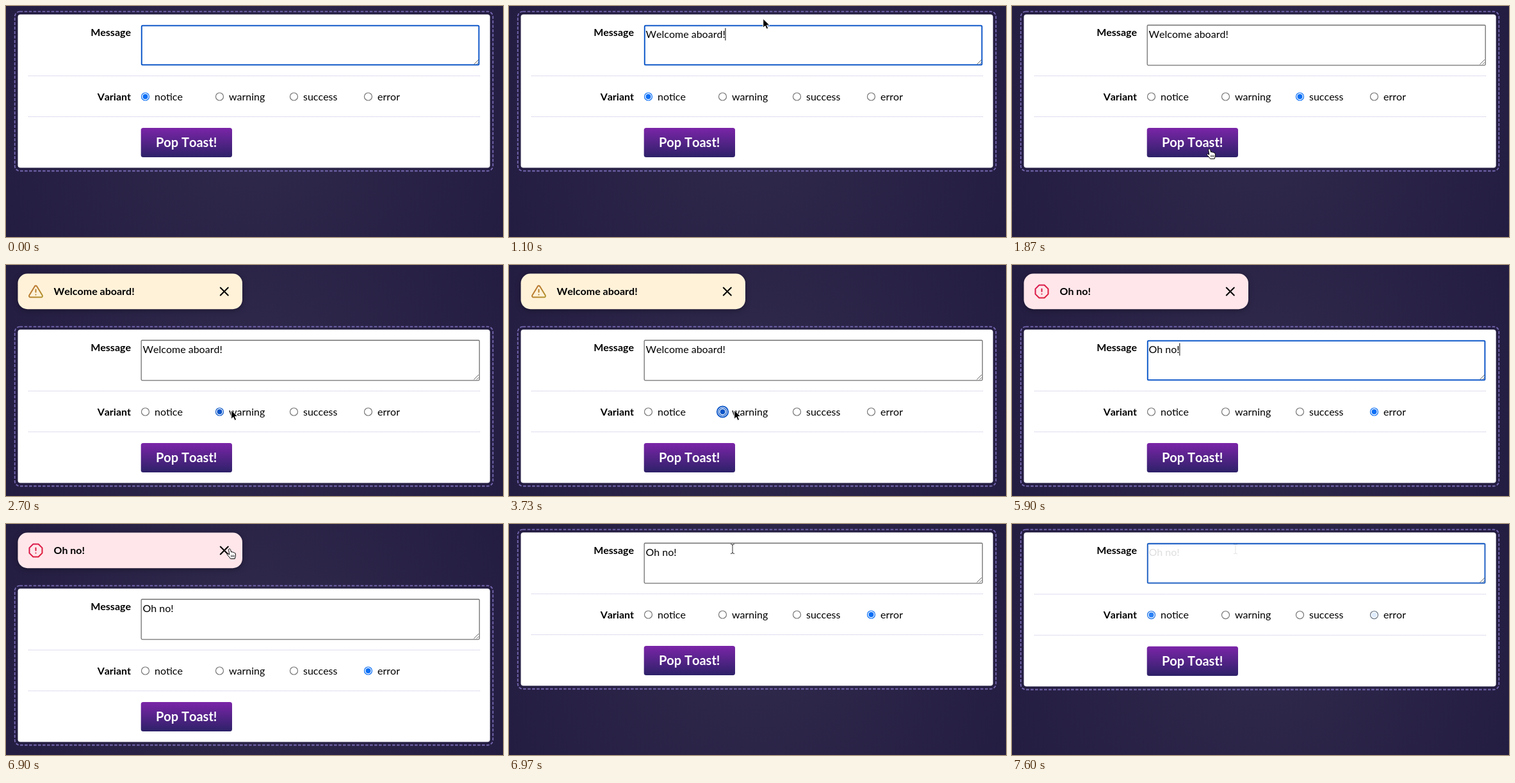
These frames come from a looping animation (776x362 px, 7630 ms). An HTML page:

```html
<!DOCTYPE html>
<html lang="en">
<head>
<meta charset="utf-8">
<title>Toast playground</title>
<style>
  html, body { margin: 0; width: 100%; height: 100%; overflow: hidden; background: #2a2346; }
  svg { display: block; font: 16px Lato, sans-serif; font-kerning: none; }
  text { white-space: pre; }
  .bold { font-weight: 700; }
  .toast { filter: drop-shadow(0 2px 4px #0005); }
  .line { fill: none; stroke-linecap: round; stroke-linejoin: round; }
</style>
</head>
<body>
<svg width="776" height="362" viewBox="0 0 776 362">
  <defs>
    <radialGradient id="night" gradientUnits="userSpaceOnUse" cx="388" cy="181" r="430">
      <stop stop-color="#302a4c"/><stop offset="1" stop-color="#241d42"/>
    </radialGradient>
    <linearGradient id="button" x2="0" y2="1">
      <stop stop-color="#7b25a8"/><stop offset="1" stop-color="#2d2168"/>
    </linearGradient>
    <g id="arrow" stroke="#fff" stroke-linejoin="round">
      <path d="M0 0V14L3.2 11L5.4 16L8 14.9L5.8 10H10.2Z"/>
    </g>
    <g id="hand" fill="#fff" stroke="#000" stroke-linejoin="round">
      <path d="M-1.4 1.2Q-1-.6 .6 0Q1.4 .4 1.7 1.6L2.6 5Q4.4 4 5.2 5.4Q6.8 4.8 7.4 6.2Q9.2 6 9.4 8Q9.8 12 8.2 15.5H1.6Q-.6 12-3.6 9.4Q-4.4 7.8-2.4 7.8L-.2 9Z"/>
      <path d="M2.8 9.5v3.5M4.9 9.5v3.5M7 9.5v3.5" stroke-width=".8"/>
    </g>
    <path id="beam" d="M-3-7.5Q0-7.5 0-5.5Q0-7.5 3-7.5M0-5.5V5.5M-3 7.5Q0 7.5 0 5.5Q0 7.5 3 7.5" fill="none" stroke="#333"/>
  </defs>
  <rect width="776" height="362" fill="url(#night)"/>
  <g id="stage"></g>
</svg>
<script>
const LOOP = 7630, FADE = 7400, SHIFT = 88, FOCUS = '#1059c9';
const stage = document.getElementById('stage');
const defs = document.querySelector('defs');
const pen = document.createElement('canvas').getContext('2d');

const variants = {
  notice: { fill: '#e9edff', from: '#3d4be0', to: '#8a35d8',
    icon: '<circle cx="12" cy="12" r="10"/><path d="M12 16v-4M12 8h.01"/>' },
  warning: { fill: '#fff2d9', from: '#bf6a30', to: '#b0982c',
    icon: '<path d="M10.3 3.9L1.8 18a2 2 0 0 0 1.7 3h17a2 2 0 0 0 1.7-3L13.7 3.9a2 2 0 0 0-3.4 0zM12 9v4M12 17h.01"/>' },
  success: { fill: '#e4f9ee', from: '#0b8f5a', to: '#1fa9a0',
    icon: '<path d="M22 11.1V12a10 10 0 1 1-5.9-9.1M22 4L12 14l-3-3"/>' },
  error: { fill: '#ffe6ea', from: '#d81450', to: '#e01f38',
    icon: '<path d="M7.9 2h8.2L22 7.9v8.2L16.1 22H7.9L2 16.1V7.9zM12 8v4M12 16h.01"/>' },
};
const names = Object.keys(variants);
for (const name of names) {
  const { from, to } = variants[name];
  defs.innerHTML += `<linearGradient id="${name}" x2="1" y2="1" gradientUnits="userSpaceOnUse" gradientTransform="scale(24)">
    <stop stop-color="${from}"/><stop offset="1" stop-color="${to}"/></linearGradient>`;
}

const choices = [[0, 'notice'], [1430, 'success'], [2630, 'warning'], [3130, 'notice'],
  [3730, 'warning'], [4100, 'success'], [4570, 'error']];
const retype = [5530, 5600, 5670, 5730, 5830, 5900];
const route = [[1030, 385, 0], [1330, 468, 142], [1570, 468, 142], [1830, 308, 224],
  [2170, 308, 224], [2570, 351.7, 227.5], [4930, 351.7, 227.5], [5200, 348, 133],
  [6370, 348, 133], [6700, 349, 39]];

const during = (t, a, b) => t >= a && t < b;
const inside = (p, x, y, w, h) => during(p.x, x, x + w) && during(p.y, y, y + h);
const label = (x, y, str, attrs = '') => `<text x="${x}" y="${y}" ${attrs}>${str}</text>`;

function textWidth(str) {
  pen.font = '16px Lato, sans-serif';
  pen.fontKerning = 'none';
  return pen.measureText(str).width;
}

function message(t) {
  if (t < 100) return '';
  if (t < retype[0]) return 'Welcome aboard!'.slice(0, Math.floor((t - 100) / 47.8) + 1);
  return 'Oh no!'.slice(0, retype.filter(at => at <= t).length);
}

function pointer(t) {
  if (t < 1030 || during(t, retype[0], 6370)) return null;
  const next = route.findIndex(p => p[0] > t);
  if (next < 0) { const [, x, y] = route.at(-1); return { x, y }; }
  const [t0, x0, y0] = route[next - 1], [t1, x1, y1] = route[next];
  const k = (t - t0) / (t1 - t0), ease = k * k * (3 - 2 * k);
  return { x: x0 + (x1 - x0) * ease, y: y0 + (y1 - y0) * ease };
}

function radio(name, i, picked, ring, mouse) {
  const x = 217.5 + i * 116, y = 142;
  const hover = mouse && inside(mouse, x - 8, y - 12, 85, 24);
  const color = picked ? (hover ? '#0a55c8' : '#0b6ff5') : (hover ? '#4f4f4f' : '#767676');
  return `<circle cx="${x}" cy="${y}" r="6" fill="#fff" stroke="${color}" stroke-width="1.2"/>`
    + (picked ? `<circle cx="${x}" cy="${y}" r="4" fill="${color}"/>` : '')
    + (picked && ring ? `<circle cx="${x}" cy="${y}" r="8.6" fill="none" stroke="${FOCUS}" stroke-width="2"/>` : '')
    + label(x + 14.5, 147.6, name);
}

function textarea(t) {
  const str = message(t), end = 213.5 + textWidth(str);
  const focused = t < 1430 || during(t, 5200, 6900);
  const selected = during(t, 5370, retype[0]);
  const caret = during(t, 100, 1270) || during(t, 5200, 6230) || during(t, 6700, 6900);
  const box = focused
    ? `<rect x="211.8" y="30.8" width="526.6" height="61.4" rx="1.5" stroke="${FOCUS}" stroke-width="2"`
    : '<rect x="211.2" y="30" width="528" height="62.8" rx="1.5" stroke="#707070" stroke-width="1.3"';
  return `${box} fill="#fff"/>`
    + '<path d="M730.5 91.5l7.5-7.5M734.8 91.5l3.2-3.2" stroke="#555" stroke-width=".9"/>'
    + (selected ? `<rect x="213.5" y="35" width="${end - 213.5}" height="20" fill="#b4d5fe"/>` : '')
    + label(213.5, 50.2, str)
    + (caret && !selected ? `<path d="M${end + .2} 34.5v19.5" stroke="#000"/>` : '');
}

function toast(str, name) {
  const { fill, icon } = variants[name];
  return `<g class="toast"><rect x="18.5" y="13.5" width="350.5" height="55.7" rx="15" fill="${fill}"/></g>
    <g class="line" stroke-width="2">
      <g transform="translate(34.5 29.5)" stroke="url(#${name})">${icon}</g>
      <path d="M334.8 35.5l12 12m0-12l-12 12" stroke="#000"/>
    </g>` + label(74.5, 47.3, str, 'class="bold"');
}

function cursor(mouse, popped, dy) {
  const onPage = { x: mouse.x, y: mouse.y - dy };
  const clickable = inside(onPage, 211, 191, 142, 46) || (popped && inside(mouse, 328, 28, 27, 28));
  const kind = clickable ? 'hand' : inside(onPage, 211, 30, 528, 63) ? 'beam' : 'arrow';
  return `<use href="#${kind}" x="${mouse.x}" y="${mouse.y}"/>`;
}

function scene(t) {
  const popped = during(t, 1900, 6970), dy = popped ? SHIFT : 0;
  const choice = choices.findLast(c => c[0] <= t)[1];
  const ring = during(t, 3130, 5200);
  const mouse = pointer(t);
  const onPage = mouse && { x: mouse.x, y: mouse.y - dy };
  return `${popped ? toast(message(t), choice) : ''}
    <g transform="translate(0 ${dy})">
      <rect x="13.7" y="8.7" width="746.6" height="249.8" rx="8" fill="none" stroke="#7668b2" stroke-width="1.8" stroke-dasharray="4.6 2.4"/>
      <rect x="18.5" y="13.2" width="737.2" height="240.4" rx="4" fill="#fff"/>
      <path d="M35 109.5H740M35 173.5H740" stroke="#c0bbdf" stroke-dasharray="1 1"/>
      <g class="bold" text-anchor="end">${label(195, 47.3, 'Message')}${label(195, 147.6, 'Variant')}</g>
      ${textarea(t)}
      ${names.map((name, i) => radio(name, i, name === choice, ring, onPage)).join('')}
      <rect x="210.7" y="191" width="142.3" height="46" rx="3.5" fill="url(#button)"/>
      ${label(281.7, 221.3, 'Pop Toast!', 'class="bold" font-size="20" fill="#fff" text-anchor="middle"')}
    </g>
    ${mouse ? cursor(mouse, popped, dy) : ''}`;
}

function draw(now) {
  const t = now % LOOP;
  if (t < FADE) {
    stage.innerHTML = scene(t);
  } else {
    const old = 1 - Math.floor((t - FADE) / 33.3 + 1) / 8;
    stage.innerHTML = `<g transform="translate(0 -.05) scale(1 1.004)">${scene(0)}<g opacity="${old}">${scene(FADE - 1)}</g></g>`;
  }
  requestAnimationFrame(draw);
}
requestAnimationFrame(draw);
</script>
</body>
</html>
```
